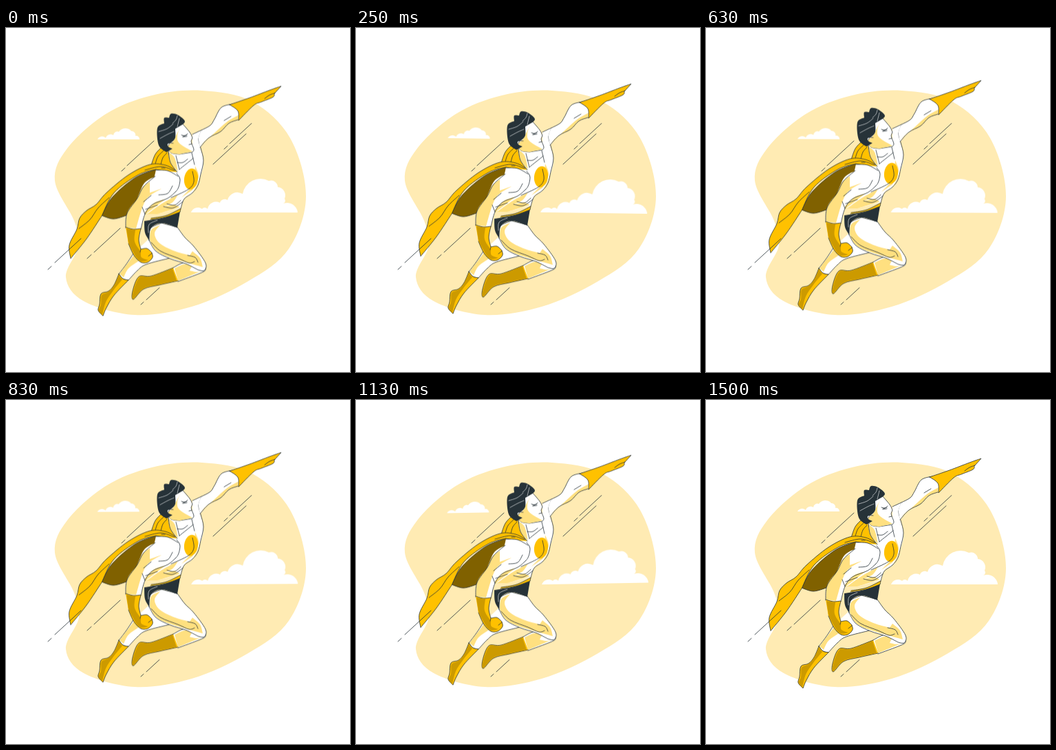
Recreate the animation shown at these times as an HTML page. Size 500 by 500 pixels, loop 1.54 s.

```html
<!DOCTYPE html>
<html lang="en">
<head>
<meta charset="utf-8">
<title>Flying hero</title>
<style>
  :root { --ink: #263238; --gold: #ffc100; --loop: 1540ms; }
  html, body { margin: 0; width: 100%; height: 100%; overflow: hidden; background: #fff; }
  svg { display: block; width: 100%; height: 100%; }
  path { stroke-linecap: round; stroke-linejoin: round; stroke-width: .8; }
  .bg { fill: #ffebb3; }
  .white { fill: #fff; }
  .skin { fill: #fff; stroke: var(--ink); }
  .gold { fill: var(--gold); stroke: var(--ink); }
  .deep { fill: #cc9a00; }
  .lining { fill: #806100; stroke: var(--ink); }
  .tone { fill: #ffe080; }
  .ink { fill: var(--ink); }
  .line { fill: none; stroke: var(--ink); }
  .shine { fill: none; stroke: #fff; stroke-width: .6; }
  #clouds { transform-origin: 279px 205px; animation: sway var(--loop) linear -40ms infinite; }
  #hero { animation: rise var(--loop) linear -40ms infinite; }
  @keyframes sway { 25% { transform: rotate(1deg); } 75% { transform: rotate(-1deg); } }
  @keyframes rise { 50% { transform: translateY(-10px); } }
</style>
</head>
<body>
<svg viewBox="0 0 500 500">
  <g id="back"></g>
  <g id="clouds"></g>
  <g id="hero">
    <g id="body"></g>
    <ellipse cx="269" cy="220" rx="10" ry="15.3" transform="rotate(7 269 220)" fill="var(--gold)"/>
    <g id="front"></g>
  </g>
  <g id="speed"></g>
</svg>
<script>
const parse = s => s.trim().split(/\s+/).map(p => p.split(',').map(Number));

function add(id, cls, d) {
  const el = document.createElementNS('http://www.w3.org/2000/svg', 'path');
  el.setAttribute('class', cls);
  el.setAttribute('d', d);
  document.getElementById(id).append(el);
}

// Smooth curve through points, without the initial move.
function curve(p, wrap) {
  const n = p.length;
  const at = i => wrap ? p[(i + n) % n] : p[Math.max(0, Math.min(n - 1, i))];
  let d = '';
  for (let i = 0; i < (wrap ? n : n - 1); i++) {
    const [a, b, c, e] = [at(i - 1), at(i), at(i + 1), at(i + 2)];
    const h1 = b.map((v, k) => v + (c[k] - a[k]) / 6);
    const h2 = c.map((v, k) => v - (e[k] - b[k]) / 6);
    d += `C${h1} ${h2} ${c}`;
  }
  return d;
}

// Closed outline; a slash marks the point before it as a corner.
function shape(id, cls, text) {
  const runs = text.split('/').map(parse), start = runs[0][0];
  let d = 'M' + start, last = [];
  runs.forEach((run, i) => {
    const end = i === runs.length - 1 ? [start] : [];
    d += curve([...last, ...run, ...end]);
    last = run.slice(-1);
  });
  add(id, cls, d + 'Z');
}

const loop = (id, cls, text) => {
  const p = parse(text);
  add(id, cls, `M${p[0]}${curve(p, true)}Z`);
};

const lines = (id, cls, ...texts) => texts.forEach(t => {
  const p = parse(t);
  add(id, cls, 'M' + p[0] + curve(p));
});

// Row of round bumps on a flat base.
const cloud = text => {
  const [first, ...rest] = parse(text);
  let d = 'M' + first, [px, py] = first;
  for (const [x, y] of rest) {
    const r = Math.hypot(x - px, y - py) * .62;
    d += `A${r} ${r} 0 0 1 ${x} ${y}`;
    [px, py] = [x, y];
  }
  add('clouds', 'white', d + 'Z');
};

const dash = (x, y, w) => add('speed', 'line', `M${x} ${y}l${w} ${-.92 * w}`);

loop('back', 'bg', '71,222 89,175 145,125 212,98 285,91 358,107 413,160 436,245 411,321 352,368 270,405 187,417 113,397 87,362 106,316 99,280');
cloud('133,162 145,160 156,156 164,151 182,150 188,157 194,162');
cloud('269,268 285,263 293,263 311,254 322,250 344,241 382,222 395,231 405,248 403,255 424,268');

// Cape
shape('body', 'gold', '211,200 217,184 226,174 / 235,178 / 239,194 249,209 / 231,201');
lines('body', 'line', '217,198 221,187 230,178', '225,199 228,189 234,182');
shape('body', 'lining', '218,206 188,218 155,246 139,273 / 156,278 175,273 / 196,248 / 217,221 /');
shape('body', 'gold', '249,209 232,200 209,199 178,214 146,240 131,257 117,266 107,277 103,293 92,316 94,335.5 / 117,307 139,274 / 157,240 192,214 218,206 / 245,211 /');
lines('body', 'line', '150,247 134,262 122,279 106,292', '245,208 225,202 202,207', '226,204 231,204');

// Far leg
shape('body', 'skin', '186,327 174,345 164,358 / 170,365 178,367 / 191,353 204,344 238,335 / 210,305 /');
shape('body', 'tone', '187,329 165,358 / 171,363 / 178,350 193,339 /');
shape('body', 'gold', '164,358 157,374 149,383 138,387 136,402 134,411 141,419 / 146,407 157,389 178,367 / 170,365');
shape('body', 'deep', '164,360 157,375 149,384 139,389 138,402 135,411 140,418 / 145,399 156,382 169,366 /');

// Near leg
shape('body', 'skin', '243,349 257,342 274,341 / 289,344 / 290,352 282,357 250,369 /');
shape('body', 'tone', '245,350 258,344 272,343 / 267,353 / 277,355 286,353 / 250,368 /');
shape('body', 'gold', '243,349 211,361 193,362 184,383 185,395 200,380 223,374 250,368 /');
shape('body', 'deep', '242,350 211,362 194,363 185,384 185,394 200,379 223,373 248,368 /');
shape('body', 'skin', '208,309 210,292 226,284 / 249,290 / 260,305 273,318 290,342 288,353 279,352 / 261,343 239,336 218,325');
shape('body', 'tone', '209,309 211,294 224,287 / 216,299 223,313 243,324 267,331 / 271,325 / 282,335 286,348 / 235,333 217,323');
lines('body', 'line', '211,312 225,325 250,335 266,342 274,340', '264,331 275,334 279,341');

// Torso
shape('body', 'white', '236,178 239,196 249,210 / 218,207 / 203,270 / 219,271 / 254,262 / 260,247 271,240 284,212 287,193 282,174 / 284,149 / 271,155 / 271,181 /');
shape('body', 'tone', '235,180 245,189 250,209 / 239,197');
shape('body', 'tone', '205,271 226,256 250,243 / 242,254 229,260 / 245,257 / 253,261 / 220,271 /');
shape('body', 'tone', '275,201 280,217 271,236 / 255,247 / 271,228');
lines('body', 'line', '271,155 284,149', '284,150 280,162 283,175 287,193 283,213 279,229 271,240 259,249 254,263',
  '236,179 239,196 249,210', '270,182 274,199', '247,186 252,206', '249,196 257,196 264,191',
  '252,206 262,198 272,190', '229,260 243,262 257,253', '234,256 245,258 254,251', '248,212 253,221 247,238 226,246');

// Briefs and belt
shape('front', 'ink', '201,281 230,276 253,267 / 249,291 / 227,284 211,291 208,309 / 202,298');
shape('front', 'gold', '211,277 233,273 254,263 / 253,268 / 233,275 210,279 /');
lines('front', 'shine', '207,298 208,286 220,280');
lines('front', 'line', '271,209 273,224 265,235 240,247');

// Raised arm
shape('front', 'white', '284,149 297,142 303,133 313,116 329,111 / 340,123 / 337,134 / 324,139 312,151 295,160 282,174 / 280,160');
shape('front', 'tone', '282,172 302,154 321,137 338,127 / 337,134 / 324,139 312,151 295,160');
lines('front', 'line', '284,149 297,142 303,133 313,116 329,111', '337,134 324,139 312,151 295,160 282,174', '317,135 327,129');
shape('front', 'gold', '325,112 354,102 383,91 400,85 / 390,96 / 388,101 371,108 360,113 338,135 / 337,121');
lines('front', 'line', '376,103 383,98 391,95');

// Head
shape('front', 'skin', '234,174 240,182 252,184 / 271,181 / 273,177 270,169 / 269,165 / 271,160 / 267,152 256,139 / 240,145 /');
shape('front', 'tone', '234,173 243,165 247,157 253,146 / 249,157 252,168 271,180 / 252,184 / 240,182');
shape('front', 'ink', '233,181 222,171 220,146 230,139 / 230,131 237,131 / 240,125 250,127 260,137 246,147 / 246,160 240,167 235,169 236,173 242,176 /');
lines('front', 'shine', '222,151 234,147 243,140', '242,139 247,134 249,128', '224,161 235,155 244,151', '249,144 252,132');
lines('front', 'line', '236,172 238,168 243,168', '266,170 270,169', '255,156 260,157 264,154', '257,159 263,158', '257,158 263,156');

// Near arm
shape('front', 'white', '218,207 235,208 250,216 / 249,234 235,248 213,257 201,274 / 196,293 / 174,290 / 176,270 189,252 201,226 218,216 /');
shape('front', 'tone', '190,250 198,233 209,224 / 209,240 / 226,234 / 203,251 189,292 / 174,290 / 177,267');
shape('front', 'tone', '202,268 215,255 232,249 / 202,272 /');
lines('front', 'line', '218,207 235,208 250,216', '217,216 200,231 191,248 176,270 174,291',
  '196,293 202,271 213,257 235,248 247,238', '202,271 198,261', '211,244 200,253', '242,230 235,241 222,243', '220,258 203,264');
shape('front', 'gold', '174,290 185,293 196,292 / 193,308 196,322 / 205,321 212,327 / 213,334 206,341 196,341 186,331 178,314 /');
shape('front', 'deep', '175,292 188,294 / 187,311 196,326 / 197,334 207,338 / 193,338 178,313 /');
lines('front', 'line', '196,322 195,326', '212,328 207,332');

dash(168, 208, 5);
dash(176, 200, 39);
dash(301, 198, 48);
dash(317, 176, 5);
dash(325, 168, 32);
dash(61, 351, 5);
dash(71, 341, 38);
dash(118, 335, 6);
dash(128, 326, 38);
dash(196, 402, 4);
dash(204, 395, 19);
</script>
</body>
</html>
```
